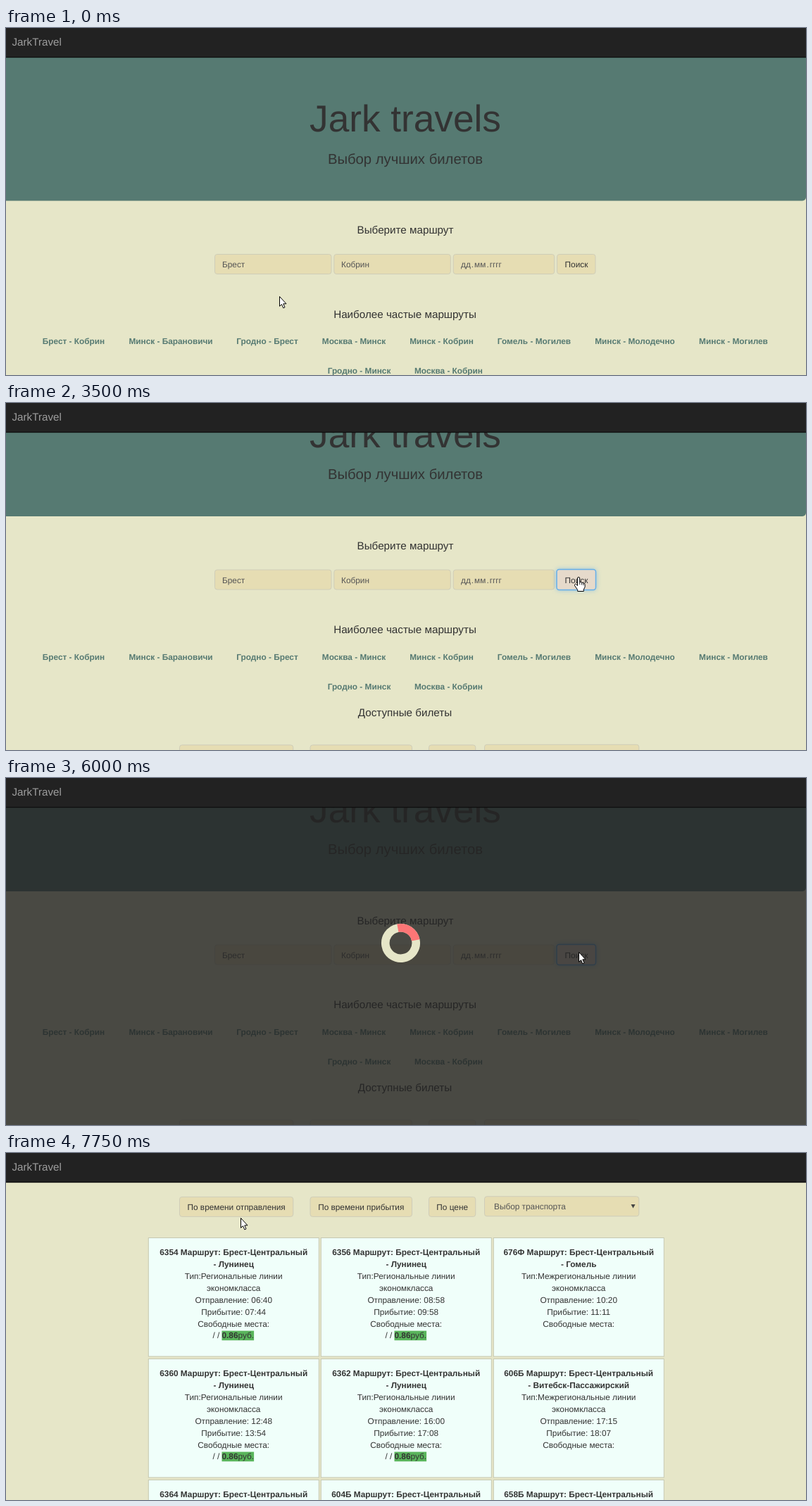
Write an HTML page that moves like this. It is 1136x493 px and loops after 8000 ms.

```html
<!DOCTYPE html>
<html lang="ru">
<head>
<meta charset="utf-8">
<title>JarkTravel</title>
<style>
  html, body { margin: 0; width: 100%; height: 100%; overflow: hidden; background: #e6e6c8; }
  svg { display: block; width: 1136px; height: 493px; }
  text {
    font: 11.83px "Liberation Sans", Arial, sans-serif;
    fill: #333; white-space: pre; text-rendering: geometricPrecision;
  }
  .mid { text-anchor: middle; }
  .bold { font-weight: bold; }
  .h1 { font-size: 53.2px; }
  .h3 { font-size: 20.28px; }
  .h4 { font-size: 15.21px; }
  .brand { font-size: 15.21px; fill: #9d9d9d; }
  .link { font-weight: bold; fill: #567a72; }
  .muted { fill: #555; }
  .field { fill: #e6ddb3; stroke: #cccbb8; stroke-width: .9; }
  .card { fill: #f0fffa; stroke: #c6c8b2; stroke-width: 1; }
  .focus { fill: #e6dacb; stroke: #66afe9; stroke-width: 1.5; filter: drop-shadow(0 0 3px rgba(102,175,233,.6)); }
  .cursor { fill: #fff; stroke: #000; stroke-width: 1; stroke-linejoin: round; }
</style>
</head>
<body>
<svg id="stage" viewBox="0 0 1136 493"></svg>
<script>
const LOOP = 8000, STEP = 250;
const stage = document.getElementById('stage');

function add(parent, tag, attrs, content) {
  const el = document.createElementNS('http://www.w3.org/2000/svg', tag);
  for (const k in attrs) el.setAttribute(k, attrs[k]);
  if (content !== undefined) el.textContent = content;
  parent.appendChild(el);
  return el;
}
const label = (parent, x, y, cls, str) => add(parent, 'text', { x, y, class: cls }, str);
const box = (parent, cls, x, y, width, height, rx = 0) =>
  add(parent, 'rect', { class: cls, x, y, width, height, rx });
const show = (el, on) => el.setAttribute('visibility', on ? 'visible' : 'hidden');

const page = add(stage, 'g', {});
const hotspots = [];

// Banner
add(page, 'path', { d: 'M0 0H1136V240.5a5 5 0 0 1-5 5H0Z', fill: '#567a72' });
label(page, 567, 147, 'mid h1', 'Jark travels');
label(page, 567, 192.5, 'mid h3', 'Выбор лучших билетов');

// Search form
label(page, 567, 292, 'mid h4', 'Выберите маршрут');
[[296.5, 165.5], [465.8, 165.5], [635.2, 143.5], [782.5, 54.5]]
  .forEach(([x, w]) => box(page, 'field', x, 321.5, w, 28, 3.4));
const focus = box(page, 'focus', 782, 321, 55.5, 29, 3.4);
label(page, 307, 340, 'muted', 'Брест');
label(page, 476, 340, 'muted', 'Кобрин');
const date = label(page, 646, 340, 'muted');
['дд', '.', 'мм', '.', 'гггг'].forEach((s, i) => add(date, 'tspan', { dx: i ? 1 : 0 }, s));
label(page, 810, 340, 'mid', 'Поиск');
hotspots.push({ x: 782, y: 321, w: 56, h: 29 });

// Popular routes
label(page, 566.5, 411.5, 'mid h4', 'Наиболее частые маршруты');
const links = [
  [96, 'Брест - Кобрин'], [234, 'Минск - Барановичи'], [371, 'Гродно - Брест'],
  [494, 'Москва - Минск'], [618.5, 'Минск - Кобрин'], [750, 'Гомель - Могилев'],
  [893, 'Минск - Молодечно'], [1033, 'Минск - Могилев'],
  [501.5, 'Гродно - Минск', 1], [628.5, 'Москва - Кобрин', 1]
].map(([x, str, row = 0]) => {
  const y = 449 + row * 42.3;
  const back = add(page, 'rect', { fill: '#d8dbc0' });
  const w = label(page, x, y, 'mid link', str).getBBox().width + 22.6;
  const spot = { x: x - w / 2, y: y - 19.5, w, h: 30.4, back };
  const { x: left, y: top, h } = spot;
  Object.entries({ x: left, y: top, width: w, height: h }).forEach(([k, v]) => back.setAttribute(k, v));
  hotspots.push(spot);
  return spot;
});

// Sorting row
label(page, 566.5, 529.5, 'mid h4', 'Доступные билеты');
[[246.5, 161.3, 'По времени отправления'], [432, 144.5, 'По времени прибытия'], [600.5, 66.3, 'По цене']]
  .forEach(([x, w, str]) => {
    box(page, 'field', x, 570.4, w, 28, 3.4);
    label(page, x + w / 2, 588.5, 'mid', str);
    hotspots.push({ x, y: 570, w, h: 28 });
  });
box(page, 'field', 679.5, 569.8, 219.3, 28, 3.4);
label(page, 693, 588, 'muted', 'Выбор транспорта');
add(page, 'path', { d: 'M887.5 581h6l-3 5.5Z', fill: '#444' });
hotspots.push({ x: 679, y: 569, w: 220, h: 28 });

// Ticket cards: number, destination, departure, arrival
[
  ['6354', 'Лунинец', '06:40', '07:44'], ['6356', 'Лунинец', '08:58', '09:58'], ['676Ф', 'Гомель', '10:20', '11:11'],
  ['6360', 'Лунинец', '12:48', '13:54'], ['6362', 'Лунинец', '16:00', '17:08'], ['606Б', 'Витебск-Пассажирский', '17:15', '18:07'],
  ['6364', 'Лунинец', '18:20', '19:27'], ['604Б', 'Гомель', '19:05', '19:58'], ['658Б', 'Гомель', '21:30', '22:21']
].forEach(([num, dest, from, to], i) => {
  const x = 202.3 + (i % 3) * 245, y = 628.5 + Math.floor(i / 3) * 172, cx = x + 120.9;
  const regional = /^\d+$/.test(num);
  box(page, 'card', x, y, 242, 168.5);
  [
    num + ' Маршрут: Брест-Центральный', '- ' + dest,
    `Тип:${regional ? 'Региональные' : 'Межрегиональные'} линии`, 'экономкласса',
    'Отправление: ' + from, 'Прибытие: ' + to, 'Свободные места:'
  ].forEach((str, n) => label(page, cx, y + 24.6 + n * 16.9, n < 2 ? 'mid bold' : 'mid', str));
  if (!regional) return;
  const base = y + 142.9;
  add(page, 'rect', { x: cx - 16.7, y: base - 10.8, width: 45.6, height: 13.6, fill: '#5ab55c' });
  label(page, cx - 29.7, base, '', '/ / ');
  const price = label(page, cx - 16.7, base, '');
  add(price, 'tspan', { class: 'bold' }, '0.86');
  add(price, 'tspan', {}, 'руб.');
});

// Loading overlay
const overlay = add(stage, 'g', {});
add(overlay, 'rect', { width: 1136, height: 493, fill: '#222', 'fill-opacity': .8 });
const ring = { r: 21.7, fill: 'none', 'stroke-width': 11.6 };
const spinner = add(overlay, 'g', {});
add(spinner, 'circle', { ...ring, stroke: '#e6e6c8' });
add(spinner, 'path', { ...ring, d: 'M0-21.7A21.7 21.7 0 0 1 21.7 0', stroke: '#fc7676' });

// Navigation bar
add(stage, 'rect', { width: 1136, height: 42, fill: '#222' });
add(stage, 'rect', { y: 41.2, width: 1136, height: 1, fill: '#080808' });
label(stage, 8.5, 25, 'brand', 'JarkTravel');

// Pointer
const pointer = add(stage, 'g', { class: 'cursor' });
const arrow = add(pointer, 'path', { d: 'M.5.5V14.3L3.5 11.6 5.8 16.8 8 15.8 5.8 10.8H10Z' });
const hand = add(pointer, 'g', {});
add(hand, 'path', {
  d: 'M-1.5 2a1.6 1.6 0 0 1 3.2 0V7.5q2.5-1 2.7.8 2.2-.7 2.4.9 2.3-.4 2.3 1.8V14.5L7.3 18V20.5H-1.3V18.5L-5.3 12.7q-.9-2 .8-2.5 1.2 0 3 2.3Z'
});
add(hand, 'path', { d: 'M1.7 7.5V11M4.4 8.5V11.5M6.8 9.5V12', fill: 'none', 'stroke-width': .8 });

const scrollKeys = [[0, 0], [500, 84.5], [6500, 84.5], [6750, 200], [7000, 325], [7250, 508]];
const mouseKeys = [
  [0, 388, 381], [250, 388, 381], [1250, 173, 376], [2000, 108, 360], [2250, 108, 360],
  [3500, 813, 247], [6000, 813, 247], [6250, 818, 247], [7000, 818, 247],
  [7250, 800, 120], [7500, 775, 4], [7750, 333, 92]
];

function at(keys, t) {
  const i = keys.findIndex(k => k[0] > t);
  if (i < 0) return keys[keys.length - 1].slice(1);
  const a = keys[i - 1], b = keys[i], p = (t - a[0]) / (b[0] - a[0]);
  return a.slice(1).map((v, n) => v + (b[n + 1] - v) * p);
}

function draw(time) {
  const t = Math.floor((time % LOOP) / STEP) * STEP;
  const [scroll] = at(scrollKeys, t);
  const [mx, my] = at(mouseKeys, t);
  const loading = t >= 3750 && t < 6250;
  const over = s => !loading && my > 42 && mx >= s.x && mx <= s.x + s.w
    && my + scroll >= s.y && my + scroll <= s.y + s.h;
  // The pointer shape lags while the page is moving under it.
  const isHand = hotspots.some(over) || (t >= 6250 && t <= 7000);

  page.setAttribute('transform', `translate(0 ${-scroll})`);
  links.forEach(s => show(s.back, over(s)));
  show(focus, t >= 3500);
  show(overlay, loading);
  spinner.setAttribute('transform', `translate(560.5 234.5) rotate(${(t - 4000) * .36 - 11})`);
  pointer.setAttribute('transform', `translate(${mx} ${my})`);
  show(arrow, !isHand);
  show(hand, isHand);
}

const start = performance.now();
function tick() {
  draw(performance.now() - start);
  requestAnimationFrame(tick);
}
tick();
</script>
</body>
</html>
```
